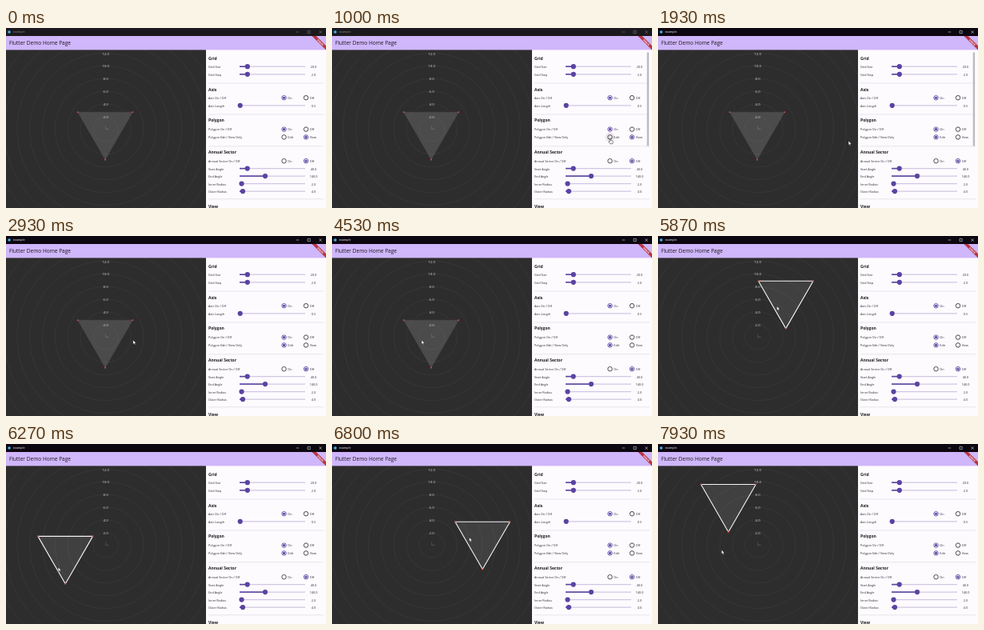
An HTML page that plays this animation: 400x225 px, repeating every 8000 ms.

```html
<!DOCTYPE html>
<html lang="en">
<head>
<meta charset="utf-8">
<title>Polygon editor</title>
<style>
html, body { margin: 0; width: 100%; height: 100%; overflow: hidden; background: #2d2d2d; }
svg { display: block; width: 100%; height: 100%; font-family: "Open Sans", "Noto Sans", sans-serif; }
</style>
</head>
<body>
<svg id="stage" viewBox="0 0 400 225" xmlns="http://www.w3.org/2000/svg">
  <defs><clipPath id="view"><rect y="27" width="250" height="198"/></clipPath></defs>
  <rect y="27" width="250" height="198" fill="#2d2d2d"/>
  <g clip-path="url(#view)">
    <g id="grid" fill="none" stroke="#414141" stroke-width=".45"></g>
    <path d="M124.7 122.5V126.4H128.5" fill="none" stroke="#777" stroke-width=".5"/>
    <g id="scale"></g>
    <g id="poly">
      <path id="tri" stroke-linejoin="round"/>
      <g id="dots" fill="#c94a46"></g>
    </g>
  </g>
  <g id="panel"><rect x="250" y="27" width="150" height="198" fill="#fefbff"/></g>
  <rect id="bar" x="393.7" y="30.5" width="2.4" height="117" fill="#bdbac0"/>
  <rect y="10" width="400" height="17.4" fill="#d0b6fb"/>
  <text x="4" y="21.4" font-size="6.55" fill="#1d1b20">Flutter Demo Home Page</text>
  <g>
    <path d="M382.4 10H387.7L400 22.3V27.6Z" fill="#b93545"/>
    <text transform="translate(392.3 18.6) rotate(45)" y=".2" font-size="2.9" font-weight="700" fill="#fff" text-anchor="middle">DEBUG</text>
  </g>
  <rect id="top" width="400" height="10"/>
  <circle cx="4" cy="5" r="1.8" fill="#45b4ee"/>
  <g id="chrome">
    <text x="8.8" y="6.4" font-size="3.7" fill="#fff">example</text>
    <path d="M362.6 5H366.2M377 3.4H380.2V6.6H377ZM391.4 3.4L394.8 6.8M394.8 3.4L391.4 6.8" fill="none" stroke="#fff" stroke-width=".5"/>
  </g>
  <path id="arrow" d="M0 0V5.3L1.25 4.2L2.1 6.1L3 5.7L2.15 3.9H3.8Z" fill="#fff" stroke="#111" stroke-width=".4"/>
  <path id="hand" d="M-.6 .3Q0-.5 .6 .3V2.5L3 3.1Q3.6 3.4 3.5 4.2L3 6.7H-.2L-2 4.3Q-1.9 3.4-.6 4.2Z" fill="#fff" stroke="#111" stroke-width=".5"/>
</svg>
<script>
const NS = "http://www.w3.org/2000/svg";
const $ = id => document.getElementById(id);
const LOOP = 8000, CLICK = 1200, GRAB = 5000;
const UNIT = 7.92, CX = 124.6, CY = 126.4;
const PURPLE = "#5b43a1";

function add(parent, tag, attrs, text) {
  const el = document.createElementNS(NS, tag);
  for (const k in attrs) el.setAttribute(k, attrs[k]);
  if (text) el.textContent = text;
  parent.appendChild(el);
  return el;
}

for (let n = 2; n <= 20; n += 2) {
  add($("grid"), "circle", { cx: CX, cy: CY, r: n * UNIT });
  if (n <= 12) add($("scale"), "text", {
    x: CX, y: CY - n * UNIT + 2.2, "font-size": 4.3, fill: "#dedede", "text-anchor": "middle"
  }, n.toFixed(1));
}

const R = 5 * UNIT;
const corners = [-150, -30, 90].map(a => {
  const rad = a * Math.PI / 180;
  return [R * Math.cos(rad), R * Math.sin(rad)];
});
$("tri").setAttribute("d", "M" + corners.map(p => p.join(" ")).join("L") + "Z");
corners.forEach(([cx, cy]) => add($("dots"), "circle", { cx, cy, r: 1.05 }));

const panel = $("panel");
const label = (x, y, text, more) =>
  add(panel, "text", { x, y: y + 1.4, "font-size": 3.75, fill: "#29262e", ...more }, text);
const heading = (y, text) =>
  label(253, y + .6, text, { "font-size": 5, "font-weight": 700, fill: "#1d1b20" });
const divider = y =>
  add(panel, "path", { d: `M253 ${y}H397`, stroke: "#d3ced8", "stroke-width": .5 });

function slider(y, name, thumb, value) {
  label(253, y, name);
  add(panel, "path", { d: `M292.5 ${y - .6}H374`, stroke: "#cfc7e1", "stroke-width": 1.2 });
  add(panel, "path", { d: `M292 ${y - .6}H${thumb}`, stroke: PURPLE, "stroke-width": 1.6 });
  add(panel, "circle", { cx: thumb, cy: y - .6, r: 3.1, fill: PURPLE });
  label(384.5, y, value, { "text-anchor": "middle" });
}

function radio(x, y, name) {
  const ring = add(panel, "circle", { cx: x, cy: y - .2, r: 2.75, fill: "none", "stroke-width": .9 });
  const dot = add(panel, "circle", { cx: x, cy: y - .2, r: 1.55, fill: PURPLE });
  label(x + 4.8, y, name);
  return on => {
    ring.setAttribute("stroke", on ? PURPLE : "#3b3840");
    dot.setAttribute("opacity", on ? 1 : 0);
  };
}

function choice(y, name, a, b, first) {
  label(253, y, name);
  const left = radio(347.5, y, a), right = radio(375, y, b);
  const set = on => { left(on); right(!on); };
  set(first);
  return set;
}

heading(38, "Grid");
slider(48.8, "Grid Size", 301.8, "20.0");
slider(58.4, "Grid Step", 301.8, "2.0");
divider(69);
heading(76.5, "Axis");
choice(87.4, "Axis On / Off", "On", "Off", true);
slider(97.4, "Axis Length", 292.7, "0.5");
divider(108);
heading(115.4, "Polygon");
choice(126.8, "Polygon On / Off", "On", "Off", true);
const halo = add(panel, "circle", { cx: 347.5, cy: 136.4, r: 5.8, fill: "#1d1b20", opacity: 0 });
const setEdit = choice(136.6, "Polygon Edit / View Only", "Edit", "View", false);
divider(147.8);
heading(155.2, "Annual Sector");
choice(166.4, "Annual Sector On / Off", "On", "Off", false);
slider(176.2, "Start Angle", 301.7, "40.0");
slider(185.7, "End Angle", 324, "140.0");
slider(195.2, "Inner Radius", 294.5, "2.0");
slider(204.7, "Outer Radius", 296, "4.0");
divider(213.8);
heading(222.8, "View");

// Each key is [time, x, y].
const centre = [
  [5000, 124, 125], [5220, 153, 106], [5470, 190.5, 84.7], [5680, 196, 75],
  [5870, 160, 76], [6060, 100, 96], [6270, 74.2, 135], [6450, 98, 168],
  [6620, 150, 161], [6800, 188.2, 117.2], [6960, 176, 85], [7150, 112, 92],
  [7320, 84, 112], [7470, 83, 86], [7600, 88, 70.3]
];
const grip = [
  [5000, -12, 5], [5470, -13.5, 4.5], [6270, -9, 18.8], [6800, -16.7, -.3],
  [7600, -12, 12], [7900, -8.6, 62]
];
const pointer = [
  [300, 404, 190], [600, 372, 162], [930, 347.8, 138], [1250, 347.8, 138],
  [1650, 300, 143], [2200, 190, 138], [2930, 158.8, 130], [3500, 157, 108],
  [4000, 150, 128], [4530, 112, 130], [5000, 112, 130]
];

// Smooth curve through the keys, held still at both ends.
function along(keys, t) {
  const last = keys.length - 1;
  if (t <= keys[0][0]) return keys[0].slice(1);
  if (t >= keys[last][0]) return keys[last].slice(1);
  let i = 0;
  while (t >= keys[i + 1][0]) i++;
  const a = keys[i], b = keys[i + 1], span = b[0] - a[0], u = (t - a[0]) / span;
  const slope = (j, k) => {
    if (j === 0 || j === last) return 0;
    const p = keys[j - 1], c = keys[j], n = keys[j + 1];
    const s1 = (c[k] - p[k]) / (c[0] - p[0]), s2 = (n[k] - c[k]) / (n[0] - c[0]);
    return s1 * s2 > 0 ? 2 * s1 * s2 / (s1 + s2) : 0;
  };
  return [1, 2].map(k =>
    (2 * u ** 3 - 3 * u * u + 1) * a[k] + (u ** 3 - 2 * u * u + u) * span * slope(i, k) +
    (3 * u * u - 2 * u ** 3) * b[k] + (u ** 3 - u * u) * span * slope(i + 1, k));
}

const clamp = v => Math.max(0, Math.min(1, v));
const show = (el, on) => el.setAttribute("visibility", on ? "visible" : "hidden");
const place = (el, [x, y]) => el.setAttribute("transform", `translate(${x} ${y})`);

function draw(t) {
  const focused = t >= CLICK, held = t >= GRAB;
  $("top").setAttribute("fill", focused ? "#0c0710" : "#1b191d");
  $("chrome").setAttribute("opacity", focused ? 1 : .5);
  setEdit(focused);

  const c = along(centre, t);
  place($("poly"), c);
  const tri = $("tri");
  tri.setAttribute("fill", held ? "rgba(255,255,255,.09)" : "rgba(255,255,255,.14)");
  tri.setAttribute("stroke", held ? "#f4f4f4" : "#505050");
  tri.setAttribute("stroke-width", held ? 1.1 : .4);

  const g = along(grip, t);
  const at = held ? [c[0] + g[0], c[1] + g[1]] : along(pointer, t);
  const onRadio = Math.hypot(at[0] - 347.8, at[1] - 137) < 6;
  place($("arrow"), at);
  place($("hand"), at);
  show($("arrow"), t > 300 && !onRadio);
  show($("hand"), onRadio);
  halo.setAttribute("opacity", onRadio ? .09 : 0);
  $("bar").setAttribute("opacity", clamp((t - 350) / 200) * clamp((2300 - t) / 300));
}

function tick() {
  draw(performance.now() % LOOP);
  requestAnimationFrame(tick);
}
draw(0);
requestAnimationFrame(tick);
</script>
</body>
</html>
```
